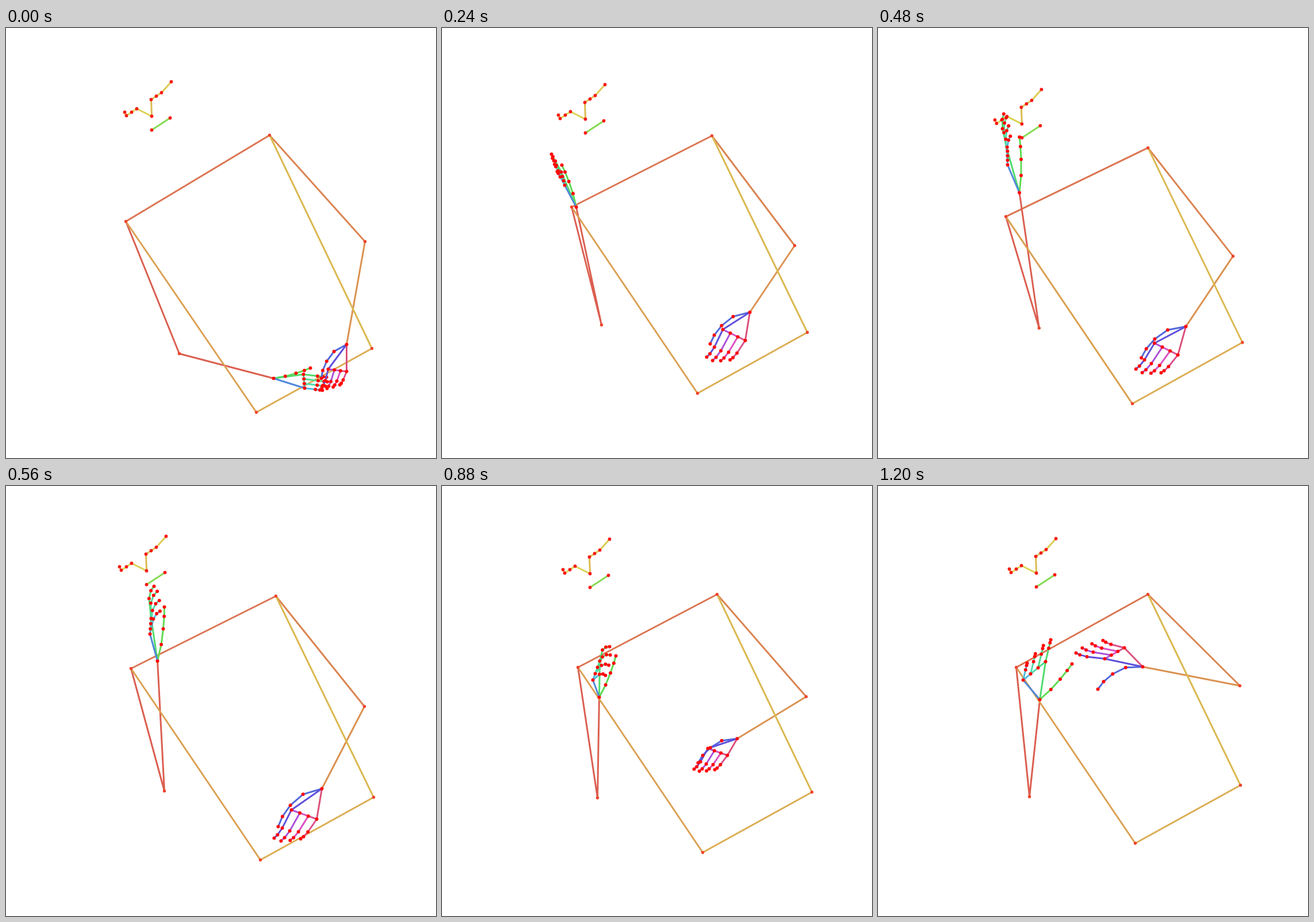
An HTML page with a canvas that plays this animation: 748x748 px, repeating every 1.28 s.

```html
<!DOCTYPE html>
<html>
<head>
<meta charset="utf-8">
<style>
html, body { margin: 0; height: 100%; overflow: hidden; background: #fff; }
canvas { display: block; }
</style>
</head>
<body>
<canvas id="stage" width="748" height="748"></canvas>
<script>
const ctx = document.getElementById("stage").getContext("2d");
const STEP = 80, STEPS = 16, TENSION = 0.6;
const keys = [];

// Forearm length and angle, then the hand's guide points turned into the forearm's frame
function armChannels(elbow, [wx, wy, ...guides], lastAngle) {
  const dx = wx - elbow[0], dy = wy - elbow[1], turn = 2 * Math.PI;
  let angle = Math.atan2(dy, dx);
  if (lastAngle !== undefined) angle += turn * Math.round((lastAngle - angle) / turn);
  const c = Math.cos(angle), s = Math.sin(angle), out = [Math.hypot(dx, dy), angle];
  for (const [gx, gy] of points(guides)) {
    const x = gx - wx, y = gy - wy;
    out.push(x * c + y * s, y * c - x * s);
  }
  return out;
}

// body: nose, shoulders, elbows, hips
// hands: wrist, thumb tip, index knuckle, index tip, little knuckle
function pose(step, body, right, left, curl) {
  const last = keys[keys.length - 1];
  keys.push({
    step,
    parts: [
      body,
      armChannels(body.slice(6, 8), right, last && last.parts[1][1]),
      armChannels(body.slice(8, 10), left, last && last.parts[2][1]),
      [curl]
    ]
  });
}

function points(list) {
  const out = [];
  for (let i = 0; i < list.length; i += 2) out.push([list[i], list[i + 1]]);
  return out;
}

pose(0, [253,153, 208,336, 458,186, 301,566, 624,371, 435,668, 636,557],
  [465,609, 529,591, 517,602, 557,607, 519,626], [592,550, 548,609, 560,593, 549,625, 592,597], 0);
pose(3, [249,158, 225,311, 469,187, 277,516, 613,378, 444,635, 635,529],
  [233,311, 208,238, 207,250, 190,219, 213,273], [535,494, 466,549, 488,524, 460,572, 527,543], 0);
pose(5, [256,184, 228,336, 470,222, 284,514, 612,407, 443,654, 629,550],
  [230,277, 219,182, 202,209, 185,142, 204,230], [526,510, 450,554, 472,532, 439,574, 509,556], 0.03);
pose(7, [244,147, 217,317, 469,191, 275,530, 623,383, 442,650, 639,541],
  [263,304, 275,210, 252,230, 257,174, 250,257], [549,526, 473,592, 496,563, 466,612, 540,579], 0.12);
pose(9, [256,148, 235,314, 480,187, 275,544, 634,374, 455,641, 648,534],
  [292,370, 324,302, 301,315, 328,295, 298,347], [559,518, 493,581, 514,559, 494,612, 555,575], 0.2);
pose(11, [257,152, 236,315, 478,188, 270,542, 633,366, 453,637, 643,532],
  [273,367, 302,295, 274,304, 291,279, 262,337], [513,439, 445,481, 462,456, 438,492, 496,468], 0.23);
pose(15, [275,151, 240,315, 469,188, 263,540, 629,347, 447,621, 630,520],
  [281,371, 337,309, 291,305, 300,267, 252,337], [460,314, 382,353, 394,300, 344,290, 428,281], 0);

// Smooth interpolation of one part between the keyed poses
function sample(part, step) {
  let i = 0;
  while (i < keys.length - 2 && step >= keys[i + 1].step) i++;
  const k = [i - 1, i, i + 1, i + 2].map(n => keys[Math.max(0, Math.min(keys.length - 1, n))]);
  const span = k[2].step - k[1].step, u = (step - k[1].step) / span;
  const u2 = u * u, u3 = u2 * u;
  const slope = (a, b, n) => TENSION * span * (b.parts[part][n] - a.parts[part][n]) / (b.step - a.step);
  return k[1].parts[part].map((v, n) =>
    (2 * u3 - 3 * u2 + 1) * v + (u3 - 2 * u2 + u) * slope(k[0], k[2], n) +
    (3 * u2 - 2 * u3) * k[2].parts[part][n] + (u3 - u2) * slope(k[1], k[3], n));
}

function guidePoints(elbow, [length, angle, ...local]) {
  const c = Math.cos(angle), s = Math.sin(angle);
  const wrist = [elbow[0] + length * c, elbow[1] + length * s];
  return [wrist, ...points(local).map(([x, y]) => [wrist[0] + x * c - y * s, wrist[1] + x * s + y * c])];
}

const mix = (a, b, t) => [a[0] + (b[0] - a[0]) * t, a[1] + (b[1] - a[1]) * t];

// Point at share t of the way from a to b, pushed sideways by a share of the length
function along(a, b, t, side) {
  const [x, y] = mix(a, b, t);
  return [x + (b[1] - a[1]) * side, y - (b[0] - a[0]) * side];
}

// Fingers follow the index finger: each is a little shorter and fans out as the hand curls
function buildHand([wrist, thumbTip, index, indexTip, little], curl, thumbBend) {
  const thumb = [wrist, along(wrist, thumbTip, 0.31, thumbBend), along(wrist, thumbTip, 0.6, thumbBend),
    along(wrist, thumbTip, 0.83, thumbBend * 0.6), thumbTip];
  const dx = indexTip[0] - index[0], dy = indexTip[1] - index[1];
  const fingers = [1, 1.02, 0.92, 0.77].map((size, f) => {
    const base = mix(index, little, f / 3);
    const c = size * Math.cos(curl * f * 0.9), s = size * Math.sin(curl * f * 0.9);
    const tip = [base[0] + dx * c - dy * s, base[1] + dx * s + dy * c];
    return [base, along(base, tip, 0.61, curl), along(base, tip, 0.86, curl * 0.7), tip];
  });
  return [thumb, ...fingers];
}

function path(list, hue) {
  ctx.strokeStyle = `hsl(${hue}, 66%, 59%)`;
  ctx.beginPath();
  list.forEach(p => ctx.lineTo(...p));
  ctx.stroke();
}

function dots(list, color, r) {
  ctx.fillStyle = color;
  for (const [x, y] of list) {
    ctx.beginPath();
    ctx.arc(x, y, r, 0, 7);
    ctx.fill();
  }
}

function drawHand(hand, hues, palmHue) {
  const wrist = hand[0][0];
  hand.forEach((finger, f) => {
    const start = f < 2 ? wrist : hand[f - 1][0];
    path([start, ...finger], hues[f]);
  });
  path([wrist, hand[4][0]], palmHue);
  dots(hand.flat(), "#ff0a0a", 3);
}

// Ear, eye, nose, eye, ear, then the mouth, all placed from the nose
function drawFace([x, y]) {
  const place = list => points(list).map(([dx, dy]) => [x + dx, y + dy]);
  const chain = place([-47,-7, -44,-1, -35,-7, -26,-13, 0,0, -1,-29, 8,-35, 17,-41, 34,-60]);
  const mouth = place([0,24, 32,3]);
  [62, 60, 58, 56, 46, 50, 51, 53].forEach((hue, i) => path(chain.slice(i, i + 2), hue));
  path(mouth, 98);
  dots([...chain, ...mouth], "#f81c16", 2.9);
}

function draw(step) {
  const [nose, rs, ls, re, le, rh, lh] = points(sample(0, step));
  const right = buildHand(guidePoints(re, sample(1, step)), sample(3, step)[0], -0.03);
  const left = buildHand(guidePoints(le, sample(2, step)), 0.05, -0.14);
  ctx.setTransform(1, 0, 0, 1, 0, 0);
  ctx.fillStyle = "#fff";
  ctx.fillRect(0, 0, 748, 748);
  ctx.translate(0.5, 0.5);
  ctx.lineWidth = 3;
  ctx.lineCap = ctx.lineJoin = "round";
  drawFace(nose);
  path([rs, ls], 15);
  path([rs, re, right[0][0]], 6);
  path([ls, le], 22);
  path([le, left[0][0]], 28);
  path([rs, rh], 34);
  path([rh, lh], 40);
  path([ls, lh], 45);
  dots([rs, ls, re, le, rh, lh], "#f0442f", 2.7);
  drawHand(right, [114, 132, 146, 160, 194], 216);
  drawHand(left, [230, 246, 280, 312, 334], 342);
}

function tick(now) {
  draw(Math.floor(now / STEP) % STEPS);
  requestAnimationFrame(tick);
}
draw(0);
requestAnimationFrame(tick);
</script>
</body>
</html>
```
